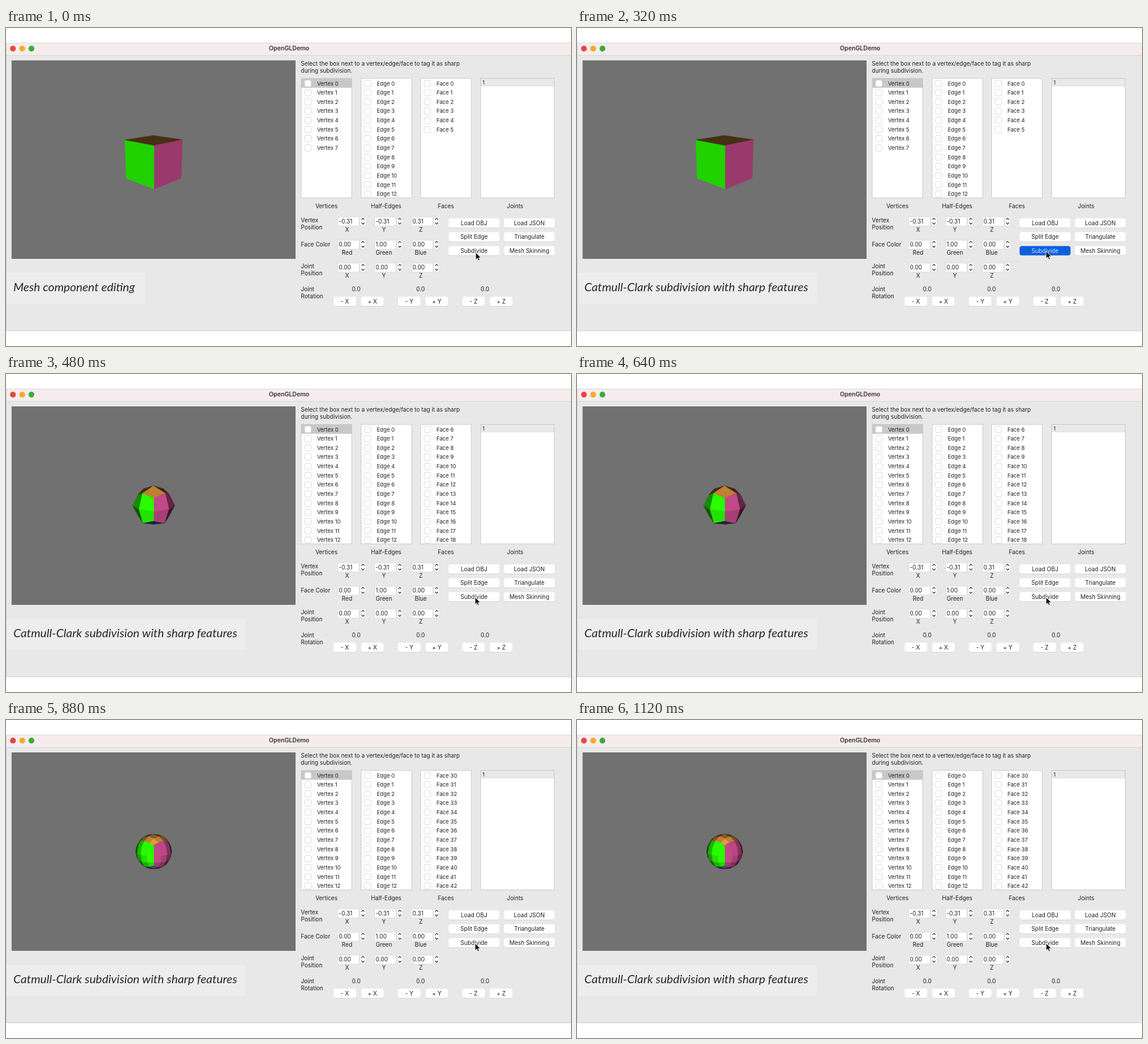
Animation, 960 px wide and 540 px high, one loop 1.2 s. Source, as an HTML page:

```html
<!DOCTYPE html>
<html lang="en">
<head>
<meta charset="utf-8">
<title>OpenGLDemo</title>
<style>
  html, body { margin: 0; width: 100%; height: 100%; overflow: hidden; background: #fff; }
  svg { display: block; width: 960px; height: 540px; }
  text { font: 9.75px Inter, "Noto Sans", sans-serif; fill: #202020; }
  .title { font-size: 10.2px; font-weight: 600; fill: #333; }
  .row { font-size: 9.2px; }
  .caption { font: italic 400 20.2px Lato, "Open Sans", sans-serif; fill: #262626; }
  .mid { text-anchor: middle; }
  .pressed text { fill: #cfe0fb; }

  /* Every change is a hard cut on an 80 ms grid. */
  .anim { animation: 1.2s step-end infinite; }
  .caption-a { animation-name: captionA; }
  .caption-b { animation-name: captionB; }
  .level0 { animation-name: level0; }
  .level1 { animation-name: level1; }
  .level2 { animation-name: level2; }
  .pressed { animation-name: press; }
  .cursor { animation-name: nudge; }
  @keyframes captionA { 0% { opacity: 1 } 6.6667%, 100% { opacity: 0 } }
  @keyframes captionB { 0% { opacity: 0 } 6.6667%, 100% { opacity: 1 } }
  @keyframes level0 { 0% { opacity: 1 } 33.3333%, 100% { opacity: 0 } }
  @keyframes level1 { 0% { opacity: 0 } 33.3333% { opacity: 1 } 66.6667%, 100% { opacity: 0 } }
  @keyframes level2 { 0% { opacity: 0 } 66.6667%, 100% { opacity: 1 } }
  @keyframes press {
    0% { opacity: 0 } 26.6667% { opacity: 1 } 33.3333% { opacity: 0 }
    60% { opacity: 1 } 66.6667%, 100% { opacity: 0 }
  }
  @keyframes nudge {
    0% { transform: translate(798px, 381px) }
    6.6667%, 100% { transform: translate(797px, 379px) }
  }
</style>
</head>
<body>
<svg id="stage" viewBox="0 0 960 540" xmlns="http://www.w3.org/2000/svg"></svg>
<script>
const range = (n, start = 0) => Array.from({ length: n }, (_, i) => i + start);

// ---- Catmull-Clark mesh ----
const add = (a, b) => a.map((x, i) => x + b[i]);
const scale = (a, k) => a.map(x => x * k);
const mean = pts => scale(pts.reduce(add), 1 / pts.length);
const dot = (a, b) => a[0] * b[0] + a[1] * b[1] + a[2] * b[2];
const sub = (a, b) => add(a, scale(b, -1));
const cross = (a, b) => [
  a[1] * b[2] - a[2] * b[1], a[2] * b[0] - a[0] * b[2], a[0] * b[1] - a[1] * b[0]
];

const GREEN = [40, 255, 0], PINK = [194, 72, 137], ORANGE = [230, 155, 60], VIOLET = [120, 110, 190];

function cube() {
  const verts = range(8).map(i => [1, 2, 4].map(bit => i & bit ? 1 : -1));
  const colors = [[GREEN, PINK], [VIOLET, ORANGE], [GREEN, PINK]];
  const faces = [];
  for (const axis of [0, 1, 2]) {
    const p = 1 << (axis + 1) % 3, q = 1 << (axis + 2) % 3;
    for (const side of [0, 1]) {
      const ids = [0, p, p + q, q].map(i => i + (side << axis));
      faces.push({ ids, color: colors[axis][side] });
    }
  }
  return { verts, faces };
}

function subdivide({ verts, faces }) {
  const centers = faces.map(f => mean(f.ids.map(i => verts[i])));
  const edges = new Map();
  const edgeKey = (a, b) => Math.min(a, b) + "-" + Math.max(a, b);
  faces.forEach((f, n) => f.ids.forEach((a, i) => {
    const b = f.ids[(i + 1) % 4], key = edgeKey(a, b);
    if (!edges.has(key)) edges.set(key, { a, b, near: [] });
    edges.get(key).near.push(centers[n]);
  }));

  const list = [...edges.values()];
  const moved = verts.map((p, i) => {
    const around = centers.filter((_, n) => faces[n].ids.includes(i));
    const mids = list.filter(e => e.a === i || e.b === i).map(e => mean([verts[e.a], verts[e.b]]));
    const n = around.length;
    return scale(add(add(mean(around), scale(mean(mids), 2)), scale(p, n - 3)), 1 / n);
  });

  const out = [...moved, ...centers];
  for (const e of list) {
    e.id = out.length;
    out.push(mean([verts[e.a], verts[e.b], ...e.near]));
  }
  const quads = faces.flatMap((f, n) => f.ids.map((a, i) => ({
    color: f.color,
    ids: [
      a, edges.get(edgeKey(a, f.ids[(i + 1) % 4])).id,
      verts.length + n, edges.get(edgeKey(a, f.ids[(i + 3) % 4])).id
    ]
  })));
  return { verts: out, faces: quads };
}

const YAW = 46 * Math.PI / 180, PITCH = 15 * Math.PI / 180, DIST = 11, FOCAL = 372;

function toCamera([x, y, z]) {
  const across = x * Math.cos(YAW) + z * Math.sin(YAW);
  const depth = z * Math.cos(YAW) - x * Math.sin(YAW);
  return [
    across,
    y * Math.cos(PITCH) - depth * Math.sin(PITCH),
    y * Math.sin(PITCH) + depth * Math.cos(PITCH)
  ];
}

function project([x, y, z]) {
  const k = FOCAL / (DIST - z);
  return (251 + x * k).toFixed(2) + "," + (223.3 - y * k).toFixed(2);
}

// The solid is convex, so dropping back faces is enough. The light sits at the camera.
function drawMesh({ verts, faces }) {
  const pts = verts.map(toCamera);
  return faces.map(({ ids, color }) => {
    const q = ids.map(i => pts[i]), center = mean(q);
    let normal = cross(sub(q[2], q[0]), sub(q[3], q[1]));
    normal = scale(normal, Math.sign(dot(normal, center)) / Math.hypot(...normal));
    if (dot(normal, sub([0, 0, DIST], center)) <= 0) return "";
    const light = Math.min(1, Math.max(0.1, 1.18 * normal[2]));
    const fill = `rgb(${color.map(c => Math.round(c * light))})`;
    return `<polygon points="${q.map(project).join(" ")}" fill="${fill}" stroke="${fill}" stroke-width=".4"/>`;
  }).join("");
}

// ---- Interface parts; text is placed by its vertical centre ----
const text = (x, y, s, cls = "") => `<text x="${x}" y="${y + 3.5}" class="${cls}">${s}</text>`;
const rect = (x, y, w, h, fill, more = "") =>
  `<rect x="${x}" y="${y}" width="${w}" height="${h}" fill="${fill}" ${more}/>`;
const anim = (cls, body) => `<g class="anim ${cls}">${body}</g>`;

const rowY = i => 94 + i * 15.64;
const listBox = (x, w) => rect(x + .5, 85.5, w, 203, "#fff", 'stroke="#cbcbcb"');
const rows = (x, word, count, first = 0) => range(count).map(i =>
  rect(x + 6.5, rowY(i) - 5.3, 11, 10.8, "#fff", 'rx="2.5" stroke="#d8d8d8" stroke-width=".9"') +
  text(x + 27.5, rowY(i), `${word} ${i + first}`, "row")).join("");

const button = (x, y, w, label, fill = "#fff") =>
  rect(x, y - 7.2, w, 16, "#cfcfcf", 'rx="4"') +
  rect(x, y - 7.8, w, 15.8, fill, 'rx="4"') +
  text(x + w / 2, y, label, "mid");

const spinner = (x, y, value, label) =>
  rect(x, y - 7, 36, 15, "#fff", 'stroke="#d6d6d6" stroke-width=".7"') +
  text(x + 1.5, y, value) +
  rect(x + 37.5, y - 8, 10, 16, "#fff", 'rx="3.5" stroke="#d2d2d2" stroke-width=".7"') +
  `<path d="M${x + 40} ${y - 2.5}l2.5-2.7 2.5 2.7m-5 5l2.5 2.7 2.5-2.7" fill="none" stroke="#333" stroke-width="1.2"/>` +
  text(x + 15.5, y + 14, label, "mid");

const spinners = (y, values, labels) =>
  values.map((v, i) => spinner(564 + i * 62.6, y, v, labels[i])).join("");

const captionBar = (w, s) =>
  rect(1, 416, w, 52, "#ededed") + `<text x="12.5" y="447" class="caption">${s}</text>`;

const frameArt =
  rect(0, 25.5, 960, 489, "#e8e8e8") +
  rect(0, 25.5, 960, 20.5, "#f6ecee") +
  rect(0, 25, 960, .8, "#d9d3d4") +
  rect(0, 46, 960, .8, "#d6d2d3") +
  rect(0, 513.6, 960, .9, "#cccccc") +
  rect(0, 26, .7, 488, "#c4c4c4") +
  ["#e5493f", "#f2ab2c", "#3bab3c"].map((c, i) =>
    `<circle cx="${11.8 + i * 15.7}" cy="35" r="4.9" fill="${c}"/>`).join("") +
  text(481, 34.8, "OpenGLDemo", "title mid") +
  rect(9.5, 55, 482.5, 337, "#717171");

const lists =
  text(501, 60, "Select the box next to a vertex/edge/face to tag it as sharp") +
  text(501, 72.5, "during subdivision.") +
  [[501, 86], [603, 86], [704, 86], [806, 125]].map(b => listBox(...b)).join("") +
  rect(502, 86, 86, 15.5, "#c8c8c8") +
  rect(807, 86, 124, 12.5, "#e9e9e9", 'stroke="#d2d2d2" stroke-width=".6"') +
  text(809.5, 92, "1", "row") +
  rows(501, "Vertex", 8) + rows(602.6, "Edge", 13) +
  [["Vertices", 544.5], ["Half-Edges", 646], ["Faces", 747.5], ["Joints", 865]]
    .map(([s, x]) => text(x, 302.5, s, "mid")).join("");

const moreVertices =
  `<g transform="translate(0 ${8 * 15.64})">${rows(501, "Vertex", 5, 8)}</g>`;

const axes = ["X", "Y", "Z"];
const controls =
  [["Vertex", 326], ["Position", 338.5], ["Face Color", 367.3], ["Joint", 404.3],
   ["Position", 416.5], ["Joint", 443], ["Rotation", 455.5]]
    .map(([s, y]) => text(501, y, s)).join("") +
  spinners(328, ["-0.31", "-0.31", "0.31"], axes) +
  spinners(367.3, ["0.00", "1.00", "0.00"], ["Red", "Green", "Blue"]) +
  spinners(406.3, ["0.00", "0.00", "0.00"], axes) +
  axes.map((a, i) => {
    const x = 556.5 + i * 109.4;
    return text(x + 38.5, 443.3, "0.0", "mid") +
      button(x, 464, 38.5, "- " + a) + button(x + 46.8, 464, 38.5, "+ " + a);
  }).join("") +
  [["Load OBJ", "Load JSON"], ["Split Edge", "Triangulate"], ["Subdivide", "Mesh Skinning"]]
    .map((pair, r) => pair.map((s, c) => button(752 + c * 94, 331 + r * 23.5, 86.5, s)).join("")).join("");

const cursor =
  '<path d="M0 0V12.6L2.9 9.9 4.8 14.2 7 13.2 5.1 9.1H9Z" fill="#111" stroke="#fff" stroke-width=".9"/>';

const mesh0 = cube(), mesh1 = subdivide(mesh0), mesh2 = subdivide(mesh1);
const faceRows = (count, first) => rows(704, "Face", count, first);

document.getElementById("stage").innerHTML =
  frameArt + lists + controls +
  anim("level0", drawMesh(mesh0) + faceRows(6, 0)) +
  anim("level1", drawMesh(mesh1) + faceRows(13, 6) + moreVertices) +
  anim("level2", drawMesh(mesh2) + faceRows(13, 30) + moreVertices) +
  anim("caption-a", captionBar(235, "Mesh component editing")) +
  anim("caption-b", captionBar(406, "Catmull-Clark subdivision with sharp features")) +
  anim("pressed", button(752, 378, 86.5, "Subdivide", "#0a60dc")) +
  anim("cursor", cursor);
</script>
</body>
</html>
```
